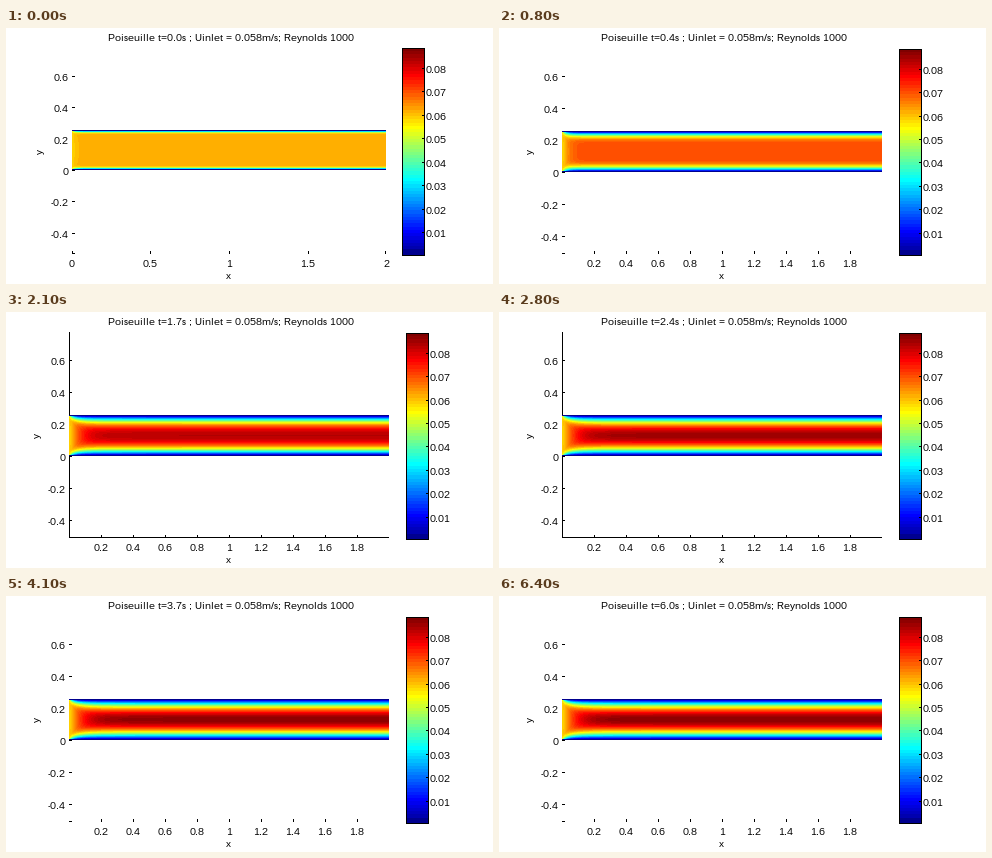
These frames come from a looping animation (487 by 256 pixels, 6500 ms). A matplotlib script:

```python
import numpy as np
import matplotlib.pyplot as plt
from matplotlib.animation import FuncAnimation
from matplotlib.colors import ListedColormap
from matplotlib.patches import Rectangle

plt.rcParams.update({
    "font.family": "Liberation Sans",
    "font.size": 10 * 72 / 64,
    "text.antialiased": True,
    "text.hinting": "native",
    "text.hinting_factor": 1,
})

W, H, DPI = 487, 256, 64
U_IN, U_TOP = 0.058, 0.0884
TOP, BASE = 20, 225          # plot frame, pixel rows
BAR_END = 228
HOLD = 4                     # extra steps on the first picture
FRAMES = 65
# spans (tenths of a second) in which the axis lines are visible
LINES_ON = ((13, 18), (23, 32), (40, 54), (57, 60))

level = np.arange(1, 65) / 64
JET = ListedColormap(np.clip(
    [1.5 - abs(4 * level - k) for k in (3, 2, 1)], 0, 1).T)

# Eigenvalues of start-up channel flow: tan(b) = b
q = (np.arange(1, 41) + 0.5) * np.pi
BETA = q - 1 / q - 2 / (3 * q**3)
DECAY = (BETA / BETA[0]) ** 2


def speed(t, cols, rows):
    """Speed in the channel at time t, growing in from a uniform inlet."""
    eta = np.linspace(-1, 1, rows)[:, None]
    x = (np.arange(cols) + 0.5) * 2 / cols
    in_time, in_space = 0.07 + 1.17 * t, 0.03 + 12 * x
    age = (in_time**-3 + in_space**-3) ** (-1 / 3)
    modes = 2 / BETA**2 * (1 - np.cos(eta * BETA) / np.cos(BETA))
    profile = 1.5 * (1 - eta**2) - modes @ np.exp(-np.outer(DECAY, age))
    reach = 0.04 * (1 - 0.5 * eta**2)
    u = U_IN * (1 + (profile - 1) * (1 - np.exp(-x / reach)))
    u[[0, -1]] = 0
    return u


fig = plt.figure(figsize=(W / DPI, H / DPI), dpi=DPI, facecolor="white")
ax = fig.add_axes([0, 0, 1, 1])
ax.axis("off")


def box(x, y, w, h, z=3):
    return ax.add_patch(Rectangle((x, y), w, h, fc="black", lw=0, zorder=z))


def label(x, y, s, ha="center", **kw):
    return ax.text(x, y, s, ha=ha, va=kw.pop("va", "baseline"), **kw)


def picture(data, x, y, w, h, top):
    return ax.imshow(data, cmap=JET, vmin=0, vmax=top, aspect="auto",
                     extent=(x, x + w, y + h, y), interpolation="nearest",
                     zorder=2)


class Panel:
    def __init__(self, left, width, roof, rows, zero, bar, bar_top, x_ticks):
        self.shape = width, rows
        scale = width / 2
        self.field = picture(speed(0, width, rows), left, roof, width, rows, U_TOP)
        self.parts = [self.field]
        add = self.parts.append

        for v in x_ticks:
            px = left + v * scale
            add(box(min(round(px), left + width - 1), BASE - 2, 1, 3, 1))
            add(label(px, 239, f"{v:g}"))
        for v in (-0.4, -0.2, 0, 0.2, 0.4, 0.6):
            py = round(zero - v * scale)
            add(box(left, py, 3, 1, 1))
            add(label(left - 3, py + 5, f"{v:g}", "right"))
        add(box(left, BASE, 3, 1, 1))
        add(label(left - 32, 123, "y", va="center", rotation=90))

        tall = BAR_END - bar_top
        add(picture(np.arange(64)[::-1, None], bar, bar_top, 23, tall, 64))
        for edge in ((bar, bar_top, 23, 1), (bar, BAR_END - 1, 23, 1),
                     (bar, bar_top, 1, tall), (bar + 22, bar_top, 1, tall)):
            add(box(*edge))
        for n in range(1, 9):
            py = round(BAR_END - tall * n / 100 / U_TOP)
            add(box(bar + 20, py, 3, 1))
            add(label(bar + 24, py + 5, f"0.0{n}", "left"))

        # the flow picture covers the part of the lines behind it
        self.lines = [box(left, TOP, 1, BASE - TOP + 1, 1),
                      box(left, BASE, width, 1, 1)]

    def show(self, on, t=0, lines=False):
        for p in self.parts:
            p.set_visible(on)
        for p in self.lines:
            p.set_visible(on and lines)
        if on:
            self.field.set_data(speed(t, *self.shape))


first = Panel(66, 314, 102, 40, 142, 396, 20, (0, 0.5, 1, 1.5, 2))
later = Panel(63, 320, 103, 41, 144, 400, 21, np.arange(1, 10) / 5)
title = label(225, 13, "")
label(222.5, 251, "x")
ax.set_xlim(0, W)
ax.set_ylim(H, 0)


def update(k):
    tenth = max(0, k - HOLD)
    t = tenth / 10
    title.set_text(f"Poiseuille t={t:.1f}s ; Uinlet = 0.058m/s; Reynolds 1000")
    lines = any(a <= tenth < b for a, b in LINES_ON)
    first.show(tenth == 0)
    later.show(tenth > 0, t, lines)
    return []


anim = FuncAnimation(fig, update, frames=FRAMES, interval=100,
                     repeat=True, repeat_delay=0, blit=False)
plt.show()
```
